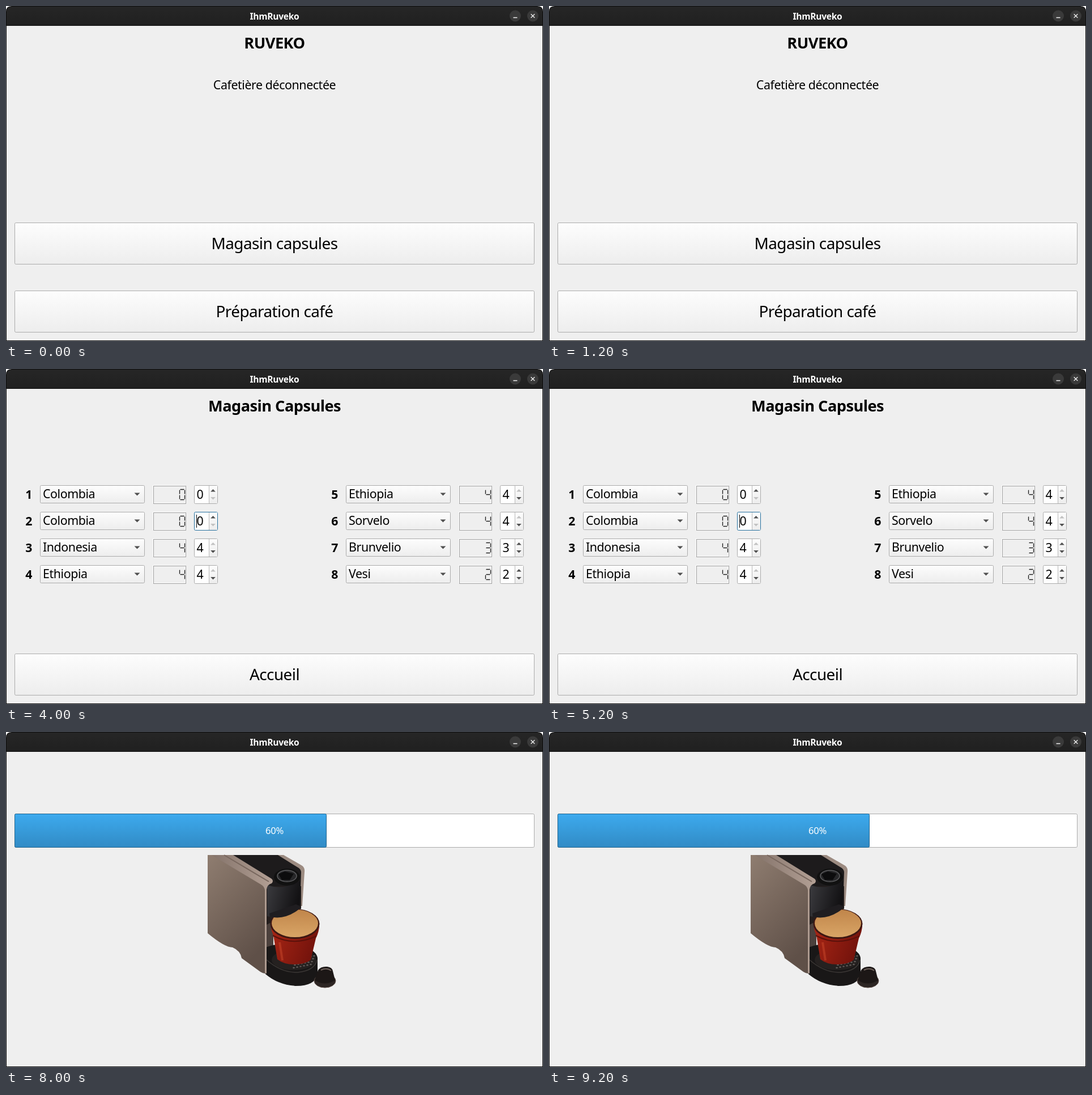
An HTML page that plays this animation: 948 by 591 pixels, repeating every 10000 ms.

```html
<!DOCTYPE html>
<html lang="fr">
<head>
<meta charset="utf-8">
<title>Cafetière</title>
<style>
  html, body { margin: 0; width: 100%; height: 100%; overflow: hidden; background: #fff; }
  svg { display: block; width: 948px; height: 591px; }
  text { font-family: "Noto Sans", "Open Sans", sans-serif; letter-spacing: -.02em; }
  .big { font-size: 27.9px; }
  .mid { font-size: 21.4px; }
  .head { font-size: 27.2px; font-weight: 700; }
  .num { font-size: 21.2px; font-weight: 700; }
  .bar { font-size: 15.6px; font-weight: 700; }
  .pct { font-size: 16.6px; }
</style>
</head>
<body>
<svg id="stage" viewBox="0 0 948 591" xmlns="http://www.w3.org/2000/svg"></svg>
<script>
const SCENE_MS = 2000;
const BRAND = "Ruveko";
const left = ["Colombia", "Colombia", "Indonesia", "Ethiopia"];
const right = ["Ethiopia", "Sorvelo", "Brunvelio", "Vesi"];
const stock = [0, 0, 4, 4, 4, 4, 3, 2];

const gradient = (id, from, to, dir = 'x2="0" y2="1"') =>
  `<linearGradient id="${id}" ${dir}><stop stop-color="${from}"/><stop offset="1" stop-color="${to}"/></linearGradient>`;

const defs = "<defs>" +
  gradient("plain", "#fdfdfd", "#ededed") +
  gradient("title", "#262626", "#202020") +
  gradient("long", "#e0b18c", "#bd9474") +
  gradient("court", "#b18a6b", "#937053") +
  gradient("blue", "#3daaee", "#318bc5") +
  gradient("panel", "#8f7d70", "#5f5048", 'x2=".5" y2="1"') +
  gradient("edge", "#84736a", "#b3a095", 'x2="1" y2="0"') +
  gradient("black", "#3c3c40", "#121113", 'x2="1" y2=".3"') +
  gradient("red", "#a92615", "#74130c", 'x2="1" y2=".3"') +
  gradient("crema", "#c0854a", "#d9a566") + "</defs>";

const text = (s, x, y, cls, fill = "#000", anchor = "middle") =>
  `<text x="${x}" y="${y}" class="${cls}" fill="${fill}" text-anchor="${anchor}">${s}</text>`;

// Box with a crisp one-pixel outline; x, y, w, h cover the outline.
const box = (x, y, w, h, fill, line = "#ababab", r = 2) =>
  `<rect x="${x + .5}" y="${y + .5}" width="${w - 1}" height="${h - 1}" rx="${r}" fill="${fill}" stroke="${line}"/>`;

const path = (d, fill, more = "") => `<path d="${d}" fill="${fill}" ${more}/>`;
const oval = (x, y, rx, ry, fill, more = "") =>
  `<ellipse cx="${x}" cy="${y}" rx="${rx}" ry="${ry}" fill="${fill}" ${more}/>`;

const heading = s => text(s, 474, 75, "head");
const wide = (s, y) => box(15, y, 918, 74, "url(#plain)") + text(s, 474, y + 47, "big");

function frame() {
  return path("M0 591V10Q0 0 10 0H938Q948 0 948 10V591Z", "#0c0c0c") +
    path("M1 34V10Q1 1 10 1H938Q947 1 947 10V34Z", "url(#title)") +
    '<rect x="1" y="35" width="946" height="555" fill="#efefef"/>' +
    text("Ihm" + BRAND, 474, 24, "bar", "#fff") +
    oval(899, 17.5, 10, 10, "#3a3a3a") + oval(930, 17.5, 10, 10, "#3a3a3a") +
    path("M895.5 20.5H902.5M926.7 14.2L933.3 20.8M933.3 14.2L926.7 20.8", "none",
      'stroke="#f2f2f2" stroke-width="1.3"');
}

function home(status) {
  return heading(BRAND.toUpperCase()) + text(status, 474, 147, "mid") +
    wide("Magasin capsules", 382) + wide("Préparation café", 502);
}

// Thin seven-segment digit, segments a to g.
const segments = ["M1 0H8", "M9 1V8", "M9 10V17", "M1 18H8", "M0 10V17", "M0 1V8", "M1 9H8"];
const lit = { 0: "abcdef", 2: "abdeg", 3: "abcdg", 4: "bcfg" };
function digit(n, x, y) {
  const d = [...lit[n]].map(c => segments["abcdefg".indexOf(c)]).join("");
  const stroke = (color, dx) =>
    path(d, "none", `stroke="${color}" stroke-width="1.4" transform="translate(${x + dx} ${y + dx})"`);
  return stroke("#fff", -1) + stroke("#1c1c1c", 0);
}

function arrow(x, y, w, dir, on = true) {
  return path(`M${x - w} ${y}H${x + w}L${x} ${y + dir * w}Z`, on ? "#505050" : "#c2c2c2");
}

function slot(i) {
  const x = i < 4 ? 0 : 540, y = Math.floor(205 + 47.2 * (i % 4)), n = stock[i];
  const focus = i === 1;
  return text(i + 1, x + 40, y + 24, "num") +
    box(x + 60, y, 185, 32, "url(#plain)") +
    text([...left, ...right][i], x + 65, y + 23, "mid", "#000", "start") +
    arrow(x + 231.5, y + 13.5, 5, 1) +
    box(x + 259, y, 58, 32, "none", "#fff", 0) +
    box(x + 260, y + 1, 58, 32, "none", "#9f9f9f", 0) +
    digit(n, x + 306.5, y + 7.5) +
    box(x + 332, y, 42, 33, "#fff", focus ? "#26709e" : "#ababab") +
    `<rect x="${x + 358}" y="${y + 1}" width="15" height="31" fill="url(#plain)"/>` +
    `<rect x="${x + 358}" y="${y + 1}" width="1" height="31" fill="#b8b8b8"/>` +
    arrow(x + 365.5, y + 11.5, 4.4, -1, n < 4) +
    arrow(x + 365.5, y + 21, 4.4, 1, n > 0) +
    text(n, x + 342.5, y + 24, "mid") +
    (focus ? `<rect x="${x + 336}" y="${y + 5}" width="1" height="23" fill="#000"/>` : "");
}

function store() {
  return heading("Magasin Capsules") + stock.map((_, i) => slot(i)).join("") + wide("Accueil", 502);
}

function choice(label, col, row, fill = "url(#plain)", ink = "#000", line = "#ababab") {
  const x = [15, 329, 642][col], y = Math.floor(165 + 69.4 * row);
  return box(x, y, col === 1 ? 290 : 291, 46, fill, line) +
    text(label, x + 145.3, y + 31, "mid", ink);
}

function brew() {
  const faint = ["url(#plain)", "#bebebe", "#c9c9c9"];
  return heading("Préparation café") +
    left.map((s, i) => i < 2 ? choice("", 0, i, ...faint) : choice(s, 0, i)).join("") +
    right.map((s, i) => choice(s, 1, i)).join("") +
    choice("Café préféré", 2, 0, ...faint) +
    choice("Café Long", 2, 2, "url(#long)", "#fff", "#9b795f") +
    choice("Café court", 2, 3, "url(#court)", "#fff", "#735640") +
    wide("Accueil", 502);
}

function machine() {
  let holes = "";
  for (let r = 0; r < 4; r++)
    for (let c = 0; c < 6; c++)
      holes += oval(514 + c * 6 - r * 2, 401 + r * 5 - c * 1.2, 1.8, 1.2, "#625c59");
  return path("M398 217H482L526 241L522 278H462Z", "#1d1b1c") +
    path("M480 217H490L523 236Q528 240 527 247L523 307H519L521 248Q521 243 517 240Z", "#9c8b81") +
    path("M458 272H521V312L472 332V384H458Z", "#241e1d") +
    path("M460 340L472 334V378L460 384Z", "#4b403c") +
    // drip tray
    path("M458 380Q500 365 535 382Q550 390 550 400V427Q546 448 512 448Q480 446 458 427Z", "#191717") +
    path("M460 402Q486 425 515 424Q545 421 549 402", "none", 'stroke="#3b3735" stroke-width="1.5"') +
    oval(508, 402, 39, 18, "#252120") + holes +
    // brewing head
    path("M461 270Q490 280 520 262L519 309Q496 334 461 325Z", "url(#black)") +
    oval(496, 256, 23, 15, "#111") +
    oval(496, 254, 17, 10, "#272729", 'stroke="#5c5c5e" stroke-width="1.5"') +
    path("M481 251L492 246L508 250L501 261H487Z", "#0c0c0d") +
    // side panel
    path("M356 217H372L460 272V426Q455 427 449 423L416 399Q414 386 400 380Q386 380 356 355Z", "url(#panel)") +
    path("M363 217H401L469 259Q473 263 469 267Q461 269 460 278V426L457 425V279Q456 272 450 269Z", "url(#edge)") +
    path("M385 217L464 264", "none", 'stroke="#77665d" stroke-width="2"') +
    // cup
    path("M467 340Q468 350 472 359L479 401Q492 411 511 410Q530 409 538 402L547 364Q553 352 553 340Z", "url(#red)") +
    path("M471 359Q508 379 548 360", "none", 'stroke="#5c110b" stroke-width="2"') +
    path("M483 371L488 403", "none", 'stroke="#d85332" stroke-width="4" opacity=".4"') +
    oval(510, 338.5, 43.5, 26.5, "#3d1712") +
    oval(510, 337.5, 41, 24.5, "url(#crema)") +
    path("M466 326Q494 332 518 312L519 307L512 304L465 320Z", "#1f1d20") +
    // capsule
    oval(563, 439, 19, 12, "#2c2523", 'stroke="#5b4b45" stroke-width="1"') +
    path("M545 438L551 420Q556 413 567 414Q576 415 577 422L581 438Q563 449 545 438Z", "#1c1716") +
    path("M556 420Q566 415 574 421", "none", 'stroke="#6f625c" stroke-width="2"');
}

function progress() {
  return box(15, 144, 918, 60, "#fff") +
    box(15, 144, 551, 60, "url(#blue)", "#22648d") +
    text("60%", 474, 180, "pct", "#fff") + machine();
}

const scenes = [
  home("Cafetière déconnectée"),
  home(`Cafetière ${BRAND.toLowerCase()}-1 connectée`),
  store(), brew(), progress()
];
const stage = document.getElementById("stage");
stage.innerHTML = defs + frame() + scenes.map(s => `<g class="scene">${s}</g>`).join("");
const groups = stage.querySelectorAll(".scene");

const start = performance.now();
function draw(now) {
  const current = Math.floor(Math.max(0, now - start) / SCENE_MS) % scenes.length;
  groups.forEach((g, i) => g.style.display = i === current ? "" : "none");
  requestAnimationFrame(draw);
}
draw(start);
</script>
</body>
</html>
```
